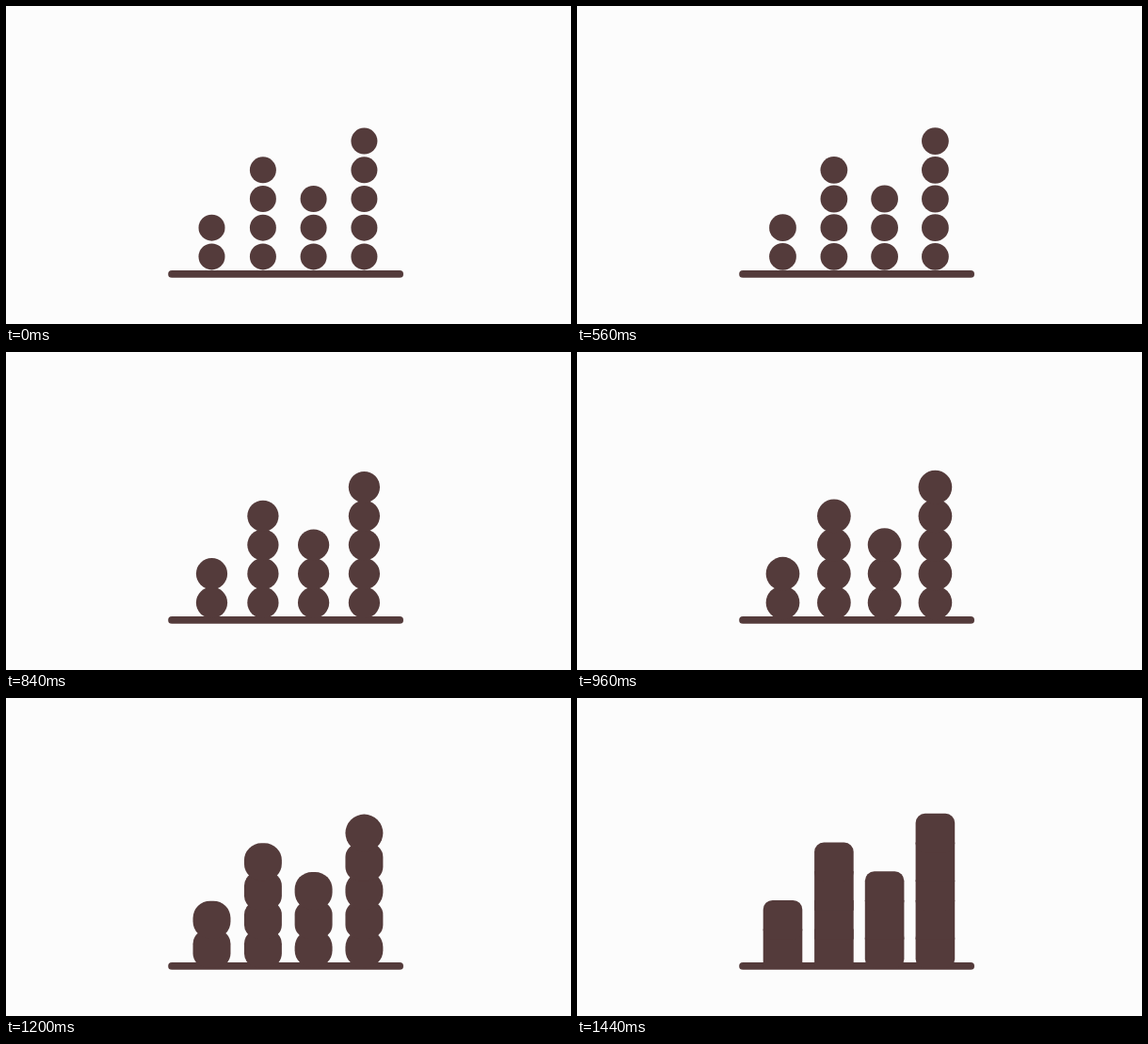
Animation, 600 px wide and 338 px high, one loop 2000 ms. Source, as an HTML page:

```html
<!DOCTYPE html>
<html lang="en">
<head>
<meta charset="utf-8">
<title>Dots to bars</title>
<style>
  html, body { margin: 0; width: 100%; height: 100%; overflow: hidden; background: #fcfcfc; }
  svg { display: block; width: 100%; height: 100%; fill: #543b3b; }
</style>
</head>
<body>
<svg id="chart" viewBox="0 0 600 338">
  <rect x="172.2" y="281.1" width="249.8" height="7.7" rx="3.85"/>
</svg>
<script>
  const LOOP = 2000, STEP = 40;
  const BASE_Y = 266.4, PITCH = 30.7;
  const SMALL = 14, LARGE = 20.8;

  // How each dot's corners tighten: final radius, start and end time
  const corners = {
    sharp: { radius: 0, from: 1120, to: 1360 },
    round: { radius: 10, from: 1120, to: 1420 },
    late: { radius: 10, from: 1270, to: 1430 }
  };
  const { sharp, round, late } = corners;

  // Dots are listed from the bottom up
  const columns = [
    { x: 218.5, dots: [sharp, round] },
    { x: 272.9, dots: [sharp, sharp, sharp, round] },
    { x: 326.6, dots: [round, sharp, round] },
    { x: 380.4, dots: [round, sharp, round, sharp, late] }
  ];

  const chart = document.getElementById('chart');
  const dots = columns.flatMap(({ x, dots }) => dots.map((corner, level) => {
    const rect = document.createElementNS(chart.namespaceURI, 'rect');
    chart.append(rect);
    return { rect, corner, x, y: BASE_Y - level * PITCH };
  }));

  const mix = (a, b, k) => a + (b - a) * k;
  function ease(t, from, to) {
    const p = Math.min(1, Math.max(0, (t - from) / (to - from)));
    return p * p * (3 - 2 * p);
  }

  function draw(t) {
    const half = mix(SMALL, LARGE, ease(t, 417, 1417));
    for (const { rect, corner, x, y } of dots) {
      const attrs = {
        x: x - half,
        y: y - half,
        width: 2 * half,
        height: 2 * half,
        rx: mix(half, corner.radius, ease(t, corner.from, corner.to))
      };
      for (const name in attrs) rect.setAttribute(name, attrs[name].toFixed(3));
    }
  }

  const start = performance.now();
  function tick() {
    const t = (performance.now() - start) % LOOP;
    draw(Math.floor(t / STEP) * STEP);
    requestAnimationFrame(tick);
  }
  tick();
</script>
</body>
</html>
```
